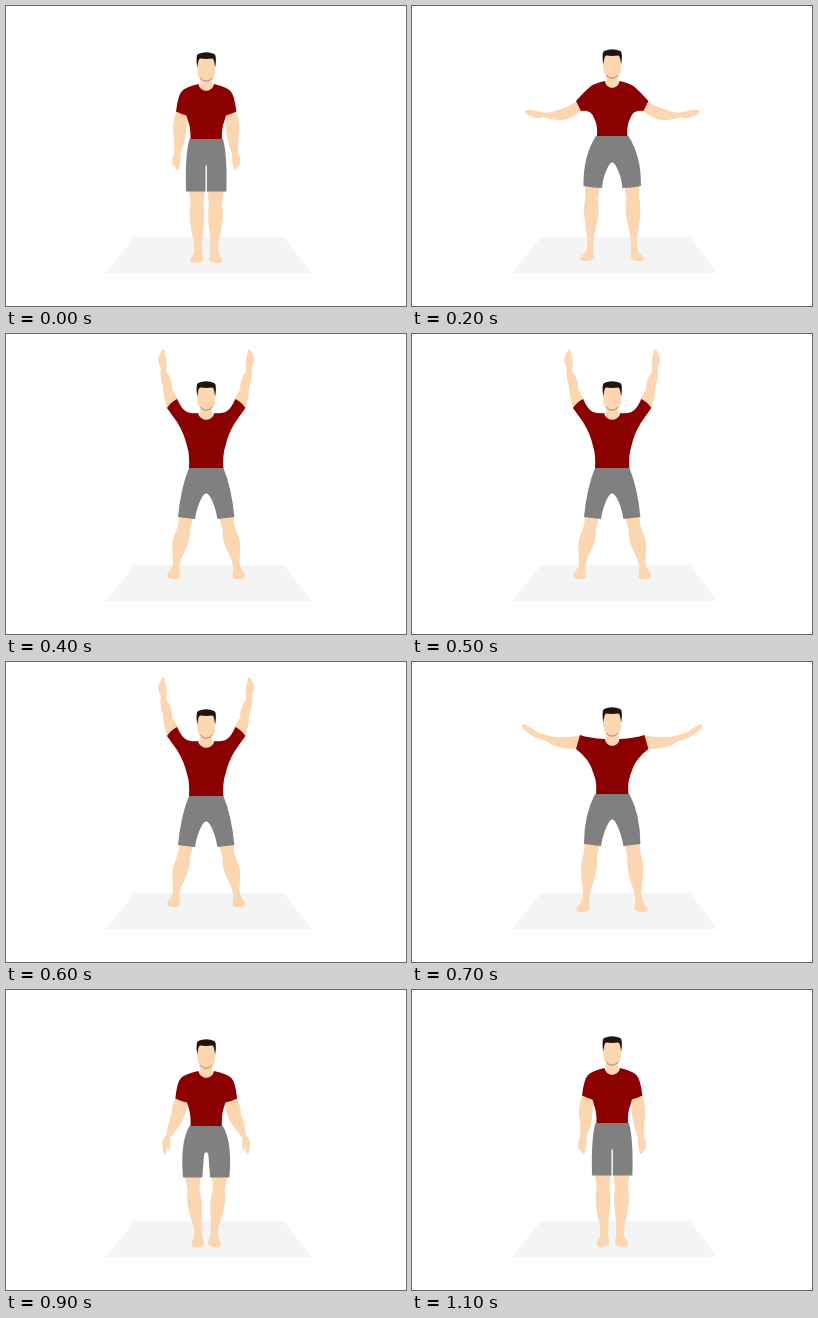
Recreate the animation shown at these times as an HTML page. Size 400 px wide and 300 px high, loop 1200 ms.

```html
<!DOCTYPE html>
<html>
<head>
<meta charset="utf-8">
<style>
  html, body { margin: 0; width: 100%; height: 100%; overflow: hidden; background: #fff; }
  svg { display: block; width: 400px; height: 300px; }
</style>
</head>
<body>
<svg viewBox="0 0 400 300">
  <path fill="#f4f4f4" d="M129 231H278L305 267H100Z"/>
  <rect id="neck" x="194.200" y="68" width="12" height="17" fill="#fbd6b0"/>
  <g id="half">
    <path id="arm" fill="#fbd6b0"/>
    <path id="leg" fill="#fbd6b0"/>
    <path id="shirt" fill="#8b0000"/>
    <path id="shorts" fill="#808080"/>
  </g>
  <use href="#half" transform="translate(400.4) scale(-1 1)"/>
  <g id="head">
    <path fill="#fbd6b0" d="M191.5 52H209L209.2 64Q209 75.5 200.2 75.5Q191.5 75.5 191.2 64Z"/>
    <path fill="none" stroke="#8a6a45" stroke-width=".7" d="M194.2 72Q200.2 78.5 206.2 72"/>
    <path fill="#21140f" d="M191.2 61.5Q189.5 50 192 48Q200.2 44.5 208.4 48Q211 50 209.2 61.5L208.2 56Q207.800 53 206.500 52.500Q200.200 53.300 194 52.500Q192.600 53 192.2 56Z"/>
  </g>
</svg>
<script>
// Left half of each pose; the right half is its mirror image.
const stand = {
  head: 0,
  arm: 'M171 103Q167 113 167 124Q169 139 168 148Q165 153 166.500 158L171 164Q173 165 173 161Q175 156 174.500 148Q180 133 180.500 122L182 106Z',
  leg: 'M182 183Q186 195 183.500 205Q183 215 187 232Q189 243 188 247L184.500 253Q184 257 188 257Q194 257 197.500 254L196 245Q196 232 198 216Q199 207 197.500 198L199 183Z',
  shirt: 'M192.500 78Q194 85 201 85V134H184.500Q185 122 182 115L180.500 109.500Q175 108 170 105.500Q172 89 176 85Q180 81 192.500 78Z',
  shorts: 'M183.500 133H201V158Q199.600 158 199.500 161V185.500H180Q179 148 183.500 133Z'
};

const crouch = {
  head: 3,
  arm: 'M171 106Q165.500 115 165.500 124Q161 137 160.500 145Q156 150 156 154L157.500 163Q160 166 160.500 161L160.500 156L163 161Q165 155 164 148Q171 139 174 135Q180 126 182 112Z',
  leg: 'M178 185Q183 198 181 207Q181 218 187 234Q189 243 188 247L185.500 253Q185 257.500 190 257.500Q195 257.500 198.500 254L196 245Q195 234 196 222Q197 211 193.500 200L194.500 185Z',
  shirt: 'M192.500 81Q194 88 201 88V137H184.500Q185 126 183 119L181 112.500Q174 111 169.300 108.500Q171 92 175 88Q179 84 192.500 81Z',
  shorts: 'M183.500 136H201V162Q198.500 162 198 165L196.300 187.500H177Q174 152 183.500 136Z'
};

const level = {
  head: -3,
  arm: 'M167 94Q152 104 134 107L125 105Q119 103 114 104Q111 106 116 109Q124 114 132 111Q146 117 158 112Q167 108 170 103Z',
  leg: 'M173 179Q174 191 172 202Q172 212 175 230Q176 241 174 246L168 252Q168 255 174 255Q180 255 182 252L181 244Q181 234 184 221Q188 207 186 194L188 179Z',
  shirt: 'M193 75Q194 82 201 82V131H185Q186 119 182 112Q179 103 169 105L164 95Q173 85 179 80Q184 77 193 75Z',
  shorts: 'M184 130H201V156Q198 156 195 163Q191 171 190 182Q180 182 171.500 180Q171 150 184 130Z'
};

const rise = {
  head: -1,
  arm: 'M170 73Q152 77 137 74L125 70Q115 63 111 62Q108 65 114 69Q121 76 134 79Q146 88 164 87Z',
  leg: 'M173 181Q172 192 169 203Q169 214 171 230Q171 238 168 242L164 248Q165 250 170 250Q176 250 178 247L177 238Q178 230 182 218Q186 206 185 194L188 181Z',
  shirt: 'M193 77Q194 84 201 84V133H184Q185 120 182 113Q178 97 164 87L168 73Q177 76 193 77Z',
  shorts: 'M183 132H201V157Q198 157 195 164Q191 172 189 184Q180 183 172 182Q172 153 183 132Z'
};

const raised = {
  head: 1,
  arm: 'M162 77Q157 62 157 52Q153 42 155 34Q151 28 153 22L156 16Q159 14 159 20Q162 28 160 37Q167 46 166 55L173 67Z',
  leg: 'M173 181Q173 192 168 202Q165 211 167 227Q167 232 165 235L161 241Q161 245 167 245Q172 246 174 243L173 234Q174 226 179 217Q184 207 184 195L188 181Z',
  shirt: 'M192 79Q194 86 201 86V135H183Q184 121 181 112Q178 99 171 88L161 74Q165 68 171 65Q176 76 181 78Q186 80 192 79Z',
  shorts: 'M183 134H201V159Q198 159 195 165Q191 173 189 185Q180 184 172 183Q175 153 183 134Z'
};

// One pose per 100 ms.
const cycle = [stand, crouch, level, rise, raised, raised, raised, rise, level, crouch, crouch, stand];
const el = id => document.getElementById(id);

function draw(now) {
  const pose = cycle[Math.floor(now / 100) % cycle.length];
  for (const part of ['arm', 'leg', 'shirt', 'shorts']) el(part).setAttribute('d', pose[part]);
  for (const part of ['head', 'neck']) el(part).setAttribute('transform', `translate(0 ${pose.head})`);
}

const start = performance.now();
function tick() {
  draw(performance.now() - start);
  requestAnimationFrame(tick);
}
tick();
</script>
</body>
</html>
```
